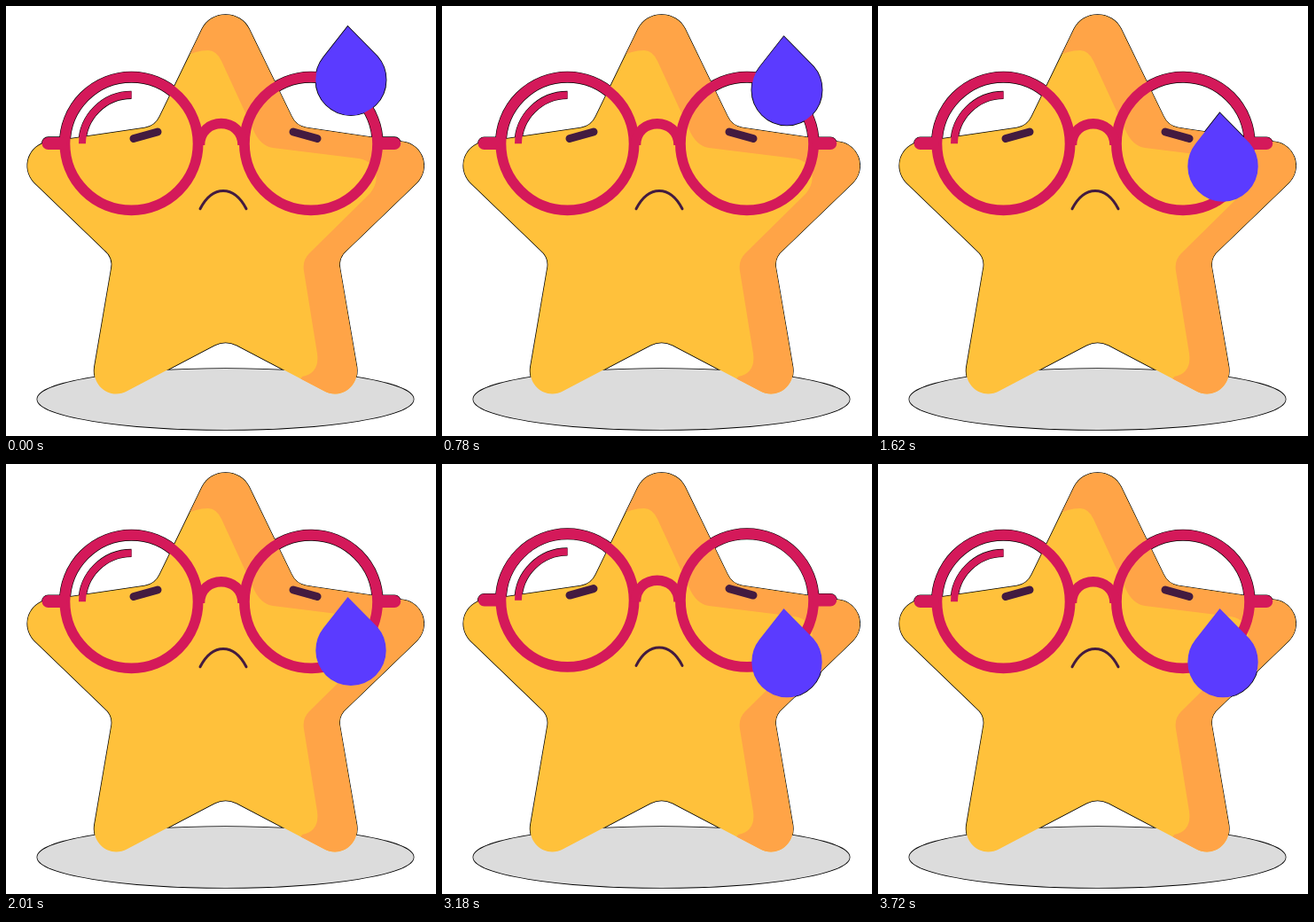
Write an HTML page that moves like this. It is 485 px wide and 485 px high and loops after 6.33 s.

```html
<!DOCTYPE html>
<html lang="en">
<head>
<meta charset="utf-8">
<title>Worried star</title>
<style>
  html, body { margin: 0; width: 100%; height: 100%; overflow: hidden; background: #fff; }
  svg { display: block; width: 100vw; height: 100vh; }
</style>
</head>
<body>
<svg viewBox="0 0 485 485" xmlns="http://www.w3.org/2000/svg">
  <defs>
    <ellipse id="ground" cx="247.5" cy="443.5" rx="212.2" ry="34.5"/>
    <path id="star" transform="translate(247.7 260) scale(.996) translate(-247.5 -260)" d="M247.5 9C259 9 269 15 274 25L322 124Q327 135 339 137L449 153C470 156 480 182 464 199L385 275Q374 284 377 297L396 408C399 430 378 445 359 435L260 383Q247.5 377 235 383L136 435C117 445 96 430 99 408L118 297Q121 284 110 275L31 199C15 182 25 156 46 153L156 137Q168 135 173 124L221 25C226 15 236 9 247.5 9Z"/>
    <path id="drop" d="M385.5 23L419 57Q428.7 68 428.7 83.5A39.7 39.7 0 0 1 349.3 83.5Q349.3 69 358 58Z"/>
    <clipPath id="inStar"><use href="#star"/></clipPath>
  </defs>

  <!-- thin dark edge, visible only against the white background -->
  <g stroke="#000" stroke-width="1.5">
    <use href="#ground"/>
    <use href="#star"/>
    <g class="face glasses" data-edge="1.2" stroke="#000"></g>
    <use class="drop" href="#drop"/>
  </g>

  <use href="#ground" fill="#dcdcdc"/>
  <use href="#star" fill="#ffc13b"/>
  <path clip-path="url(#inStar)" fill="#ffa447" d="M200 58Q214 50 228 50Q237 50 243 62L279 140Q287 158 301 160L398 172C418 175 424 196 410 212L342 279Q334 287 336 299L351 392Q354 414 334 418L320 440H485V0H200Z"/>

  <g class="face" fill="none" stroke="#431b40" stroke-linecap="round">
    <path stroke-width="9" d="M144 149.5L171 142M324 142L351 149.5"/>
    <path stroke-width="3" d="M219 228.8C233 201.8 257 201.8 271 228.8"/>
  </g>
  <g class="face glasses" data-edge="0" stroke="#d4195a"></g>
  <use class="drop" href="#drop" fill="#5b3bff"/>
</svg>
<script>
  const LOOP = 6330;
  const LIFT = 11;
  const FALL = 140;

  const all = name => document.querySelectorAll('.' + name);
  const clamp = p => Math.min(1, Math.max(0, p));

  for (const g of all('glasses')) {
    const edge = +g.dataset.edge;
    const line = (width, d, cap = 'butt') =>
      `<path fill="none" stroke-width="${width + edge}" stroke-linecap="${cap}" d="${d}"/>`;
    const ring = cx => `<circle cx="${cx}" cy="155.3" r="75.1" fill="none" stroke-width="${11.8 + edge}"/>`;
    g.innerHTML = ring(141.5) + ring(344)
      + line(11.5, 'M218.5 157C218.5 124.5 267 124.5 267 157')
      + line(14, 'M47.6 155H62M424 155H438.2', 'round')
      + line(8, 'M86 155.3A55.5 55.2 0 0 1 141.5 100.4');
  }

  // Cubic bezier (1/6, 1/6, 2/3, 1): steady start, soft landing
  function ease(p) {
    const curve = (a, b, s) => 3 * a * s * (1 - s) ** 2 + 3 * b * s * s * (1 - s) + s ** 3;
    let lo = 0, hi = 1;
    for (let i = 0; i < 24; i++) {
      const mid = (lo + hi) / 2;
      if (curve(1 / 6, 2 / 3, mid) < p) lo = mid; else hi = mid;
    }
    return curve(1 / 6, 1, (lo + hi) / 2);
  }

  const tween = (t, start, end) => ease(clamp((t - start) / (end - start)));
  const hop = (t, start) => tween(t, start, start + 285) - tween(t, start + 285, start + 570);

  function move(name, y) {
    for (const el of all(name)) el.setAttribute('transform', `translate(0 ${y.toFixed(3)})`);
  }

  function draw(t) {
    move('face', -LIFT * (hop(t, 0) + hop(t, 3150)));
    move('drop', FALL * tween(t, 660, 2400));
  }

  const begin = performance.now();
  function tick() {
    draw((performance.now() - begin) % LOOP);
    requestAnimationFrame(tick);
  }
  draw(0);
  requestAnimationFrame(tick);
</script>
</body>
</html>
```
